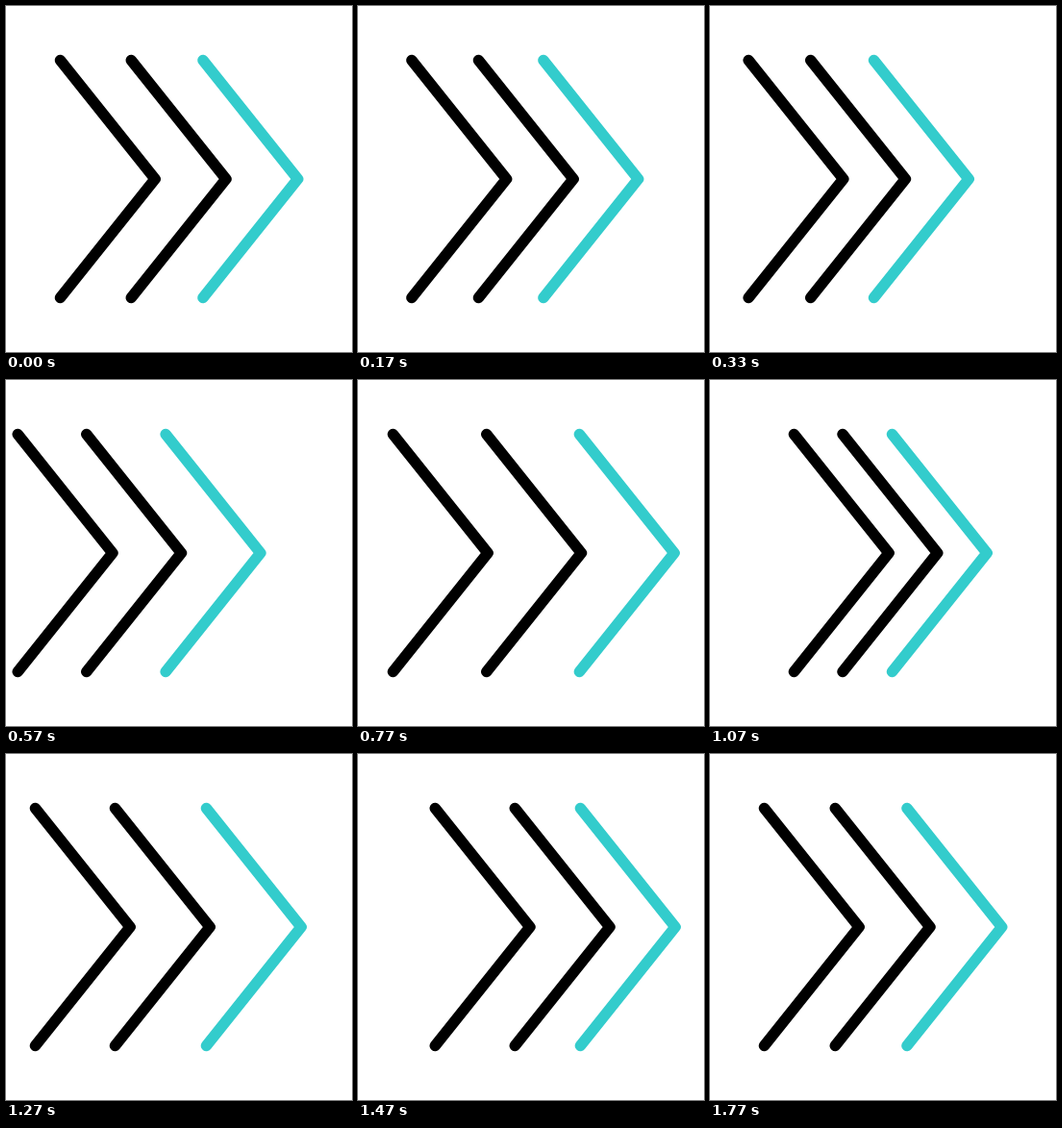
An HTML page that plays this animation: 360x360 px, repeating every 2000 ms.

```html
<!DOCTYPE html>
<html lang="en">
<head>
<meta charset="utf-8">
<title>Chevrons</title>
<style>
  @property --frame {
    syntax: "<number>";
    inherits: true;
    initial-value: 0;
  }

  html, body {
    margin: 0;
    width: 100%;
    height: 100%;
    overflow: hidden;
    background: #fff;
  }

  /* 30 frames per second; the small delay rounds frame starts to 10 ms */
  svg {
    display: block;
    width: 100%;
    height: 100%;
    animation: play 2s steps(60) -5ms infinite;
  }

  @keyframes play {
    from { --frame: 0; }
    to { --frame: 60; }
  }

  /* Five eased swings, each chevron running --lag frames late */
  path {
    fill: none;
    stroke: #000;
    stroke-width: 11.6;
    stroke-linecap: round;
    stroke-linejoin: round;

    --t: calc(var(--frame) - var(--lag));
    --p1: clamp(0, var(--t) / 15, 1);
    --p2: clamp(0, (var(--t) - 15) / 11, 1);
    --p3: clamp(0, (var(--t) - 26) / 8, 1);
    --p4: clamp(0, (var(--t) - 34) / 8, 1);
    --p5: clamp(0, (var(--t) - 42) / 7, 1);

    transform: translateX(calc(
      -46.5px * var(--p1) * var(--p1) * (3 - 2 * var(--p1)) +
      88px * var(--p2) * var(--p2) * (3 - 2 * var(--p2)) -
      67.5px * var(--p3) * var(--p3) * (3 - 2 * var(--p3)) +
      59px * var(--p4) * var(--p4) * (3 - 2 * var(--p4)) -
      33px * var(--p5) * var(--p5) * (3 - 2 * var(--p5))
    ));
  }

  .back { --lag: 4; }
  .middle { --lag: 2; }
  .front { --lag: 0; stroke: #33cccc; }
</style>
</head>
<body>
<svg viewBox="0 0 360 360">
  <path class="back" d="M56.5 56.5l98.6 123.5l-98.6 123.5"/>
  <path class="middle" d="M130.3 56.5l98.6 123.5l-98.6 123.5"/>
  <path class="front" d="M205 56.5l98.6 123.5l-98.6 123.5"/>
</svg>
</body>
</html>
```
